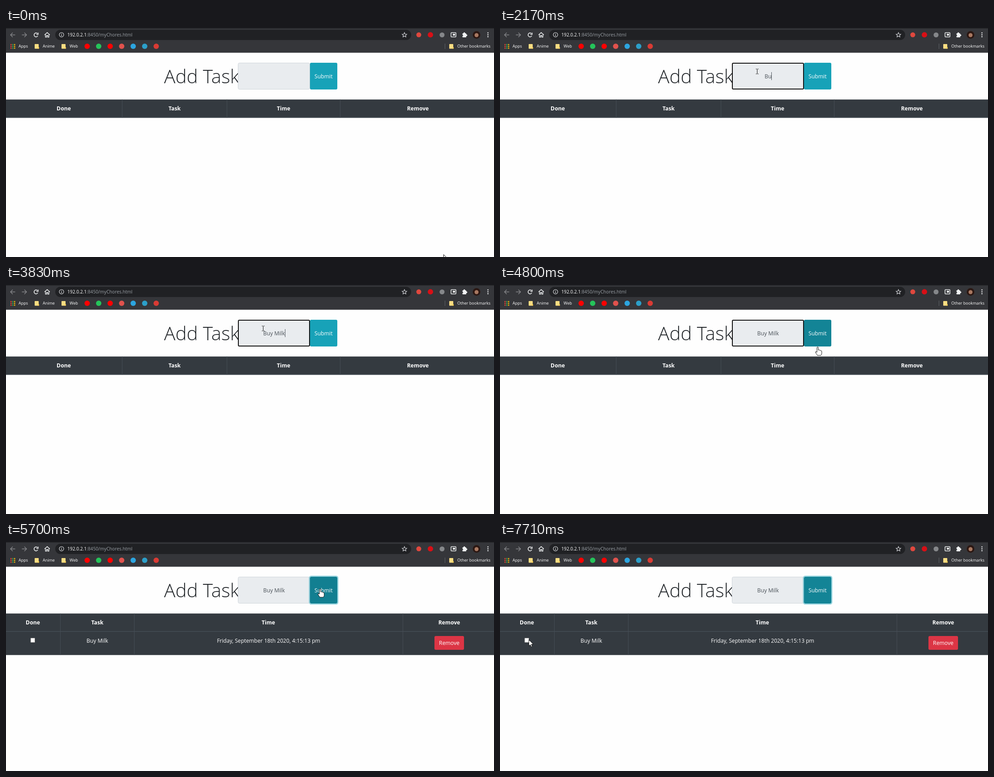
Write an HTML page with a canvas that moves like this. It is 1090x514 px and loops after 8 s.

```html
<!DOCTYPE html>
<html lang="en">
<head>
<meta charset="utf-8">
<title>Task list</title>
<style>
html, body { margin: 0; width: 100%; height: 100%; overflow: hidden; background: #fff; }
canvas { display: block; }
</style>
</head>
<body>
<canvas id="stage" width="1090" height="514"></canvas>
<script>
const ctx = document.getElementById('stage').getContext('2d');
const LOOP = 8000;
const TASK = 'Buy Milk';
const KEY_TIMES = [1840, 2170, 2380, 2600, 3060, 3280, 3590, 3830];
const CARET_SPANS = [[950, 1500], [1840, 4360], [4920, 5480]];
const CLICKS = [[950, 1070], [5480, 5700]];
// Pointer legs: first step, last step, step count, from x, y, to x, y
const LEGS = [
  [100, 850, 8, 977, 508, 574, 97],
  [4600, 4800, 3, 574, 97, 709, 138],
  [4920, 5370, 5, 709, 138, 701, 104],
  [6020, 6800, 8, 701, 104, 166, 222],
  [6920, 7710, 8, 166, 222, 64, 219]
];
const ARROW = new Path2D('M0 0V14L3.2 11 5.4 16 7.6 15 5.5 10.2H10Z');
const HAND = new Path2D('M-1.5 1.5Q0-.5 1.5 1.5V7.5Q4 6.5 5 8.3Q7 7.8 7.5 9.3Q9.2 9 9.2 11V15Q9 18 7 19.5H-.5Q-2 17-4.5 13.5Q-5.3 10.7-3.5 11L-1.5 12.5Z');
const BEAM = new Path2D('M-3-5.5H-.7M.7-5.5H3M0-5V5M-3 5.5H-.7M.7 5.5H3');

const within = (t, spans) => spans.some(([a, b]) => t >= a && t < b);

function rect(x, y, w, h, color) {
  ctx.fillStyle = color;
  ctx.fillRect(x, y, w, h);
}

function box(x, y, w, h, r, fill, stroke, lineWidth = 1) {
  ctx.beginPath();
  ctx.roundRect(x, y, w, h, r);
  paint(fill, stroke, lineWidth);
}

function disc(x, y, r, fill, stroke, lineWidth) {
  ctx.beginPath();
  ctx.arc(x, y, r, 0, 7);
  paint(fill, stroke, lineWidth);
}

function paint(fill, stroke, lineWidth = 1) {
  if (fill) { ctx.fillStyle = fill; ctx.fill(); }
  if (stroke) { ctx.strokeStyle = stroke; ctx.lineWidth = lineWidth; ctx.stroke(); }
}

function icon(x, y, d, color, lineWidth = 1.4) {
  ctx.save();
  ctx.translate(x, y);
  ctx.strokeStyle = color;
  ctx.lineWidth = lineWidth;
  ctx.stroke(new Path2D(d));
  ctx.restore();
}

function text(s, x, y, { size = 12.2, weight = 400, color = '#fff', align = 'center' } = {}) {
  ctx.font = `${weight} ${size}px "Open Sans", "Noto Sans", sans-serif`;
  ctx.textAlign = align;
  ctx.fillStyle = color;
  ctx.fillText(s, x, y);
  return ctx.measureText(s).width;
}

function folder(x, label) {
  box(x, 36, 9, 10.5, 1, '#fbdd82');
  rect(x + 7.5, 43, 2.5, 3.5, '#f3c94f');
  text(label, x + 18, 44.4, { size: 9, align: 'left' });
}

function drawBrowser() {
  rect(0, 0, 1090, 55.5, '#35363a');
  rect(0, 0, 1090, 1, '#1d1e20');
  box(110, 4, 795, 23, 11.5, '#202124');

  icon(15, 15.5, 'M5.5 0H-5M0-5L-5 0L0 5', '#86878a');
  icon(41, 15.5, 'M-5.5 0H5M0-5L5 0L0 5', '#86878a');
  icon(67, 15.5, 'M4 2A4.4 4.4 0 1 1 3.3-3M4.7-5V-1H.7', '#f1f3f4', 1.6);
  icon(92, 15.5, 'M-6 0L0-5.2L6 0M-3.8-1V5H-1.3V1.3H1.3V5H3.8V-1', '#f1f3f4');
  disc(124, 15.2, 5, null, '#e8eaed', 1.1);
  icon(124, 15.2, 'M0-3V-1.7M0-.7V3', '#e8eaed', 1.2);

  const urlStyle = { size: 10.2, align: 'left' };
  const hostWidth = text('192.0.2.1', 137, 19, urlStyle);
  text(':8450/myChores.html', 137 + hostWidth, 19, { ...urlStyle, color: '#9aa0a6' });

  icon(890, 15.5, 'M0-5.3L1.5-1.8L5.3-1.5L2.4 1L3.3 4.7L0 2.7L-3.3 4.7L-2.4 1L-5.3-1.5L-1.5-1.8Z', '#dadce0', 1.1);
  disc(922, 15.3, 5.5, '#e0483e');
  disc(948, 15.3, 6, '#d80f16');
  disc(974, 15.5, 5.5, '#85878a');
  box(994, 10.5, 11, 9.5, 1, null, '#f1f3f4', 1.5);
  rect(998, 13, 5, 4, '#f1f3f4');
  box(1019.5, 12, 8.5, 9, 1, '#f1f3f4');
  disc(1023.7, 11.8, 2, '#f1f3f4');
  disc(1028.3, 16.3, 2, '#f1f3f4');
  disc(1019.5, 16.5, 1.5, '#35363a');
  disc(1051, 15.5, 8.5, '#2b1712');
  disc(1051, 16, 4.5, '#a87861');
  for (const y of [11, 15.3, 19.6]) disc(1076.5, y, 1.3, '#f1f3f4');

  const dots = ['#ea4335', '#34a853', '#fbbc04', '#4285f4'];
  for (let i = 0; i < 9; i++) {
    const row = Math.floor(i / 3);
    rect(10 + i % 3 * 4, 36 + row * 4, 2.5, 2.5, dots[(i + row) % 4]);
  }
  text('Apps', 28, 44.4, { size: 9, align: 'left' });
  folder(64, 'Anime');
  folder(124, 'Web');
  ['#f00', '#25c45a', '#f00', '#e0524d', '#2ca5e0', '#2c9fc9', '#d93b34']
    .forEach((color, i) => disc(181.3 + i * 25.7, 41, 6, color));
  rect(980, 35, 1, 12, '#5f6368');
  folder(990, 'Other bookmarks');
}

function drawForm(t) {
  text('Add Task', 353, 123.7, { size: 42.3, weight: 300, color: '#212529', align: 'left' });

  const focused = t >= 950 && t < 5480;
  if (focused) box(519, 79, 159, 58, 2, '#e9ecef', '#101010', 2);
  else box(518.5, 78.5, 160, 59, 3, '#e9ecef', '#ced4da');

  const typed = TASK.slice(0, KEY_TIMES.filter(k => k <= t).length);
  const width = text(typed, 598.7, 113, { color: '#495057' });
  if (within(t, CARET_SPANS)) rect(Math.round(598.7 + width / 2), 99, 1, 18, '#495057');

  const ring = t < 5610 ? 0 : t < 5700 ? 1.8 : 2.5;
  if (ring) box(679 - ring / 2, 78 - ring / 2, 61 + ring, 60 + ring, 4, null, 'rgba(58,176,195,.5)', ring);
  const color = t < 4800 ? '#17a2b8' : t < 5480 ? '#138496'
    : t < 5700 ? '#117a8b' : t < 5800 ? '#127f91' : '#138496';
  box(679, 78, 61, 60, 3, color);
  text('Submit', 709.3, 113);
}

function drawTable(filled) {
  const line = '#454d55';
  const top = 160.5;
  const height = (filled ? 253.7 : 201.5) - top;
  const centers = filled ? [60, 204, 586, 990] : [129, 376.5, 620, 920];
  const edges = filled ? [121, 286, 886] : [259, 493, 746];
  rect(0, top, 1090, height, '#343a40');
  rect(0, 200, 1090, 1.5, line);
  for (const x of edges) rect(x, top, 1, height, line);
  ['Done', 'Task', 'Time', 'Remove'].forEach((s, i) => text(s, centers[i], 185.4, { weight: 700 }));
  if (!filled) return;
  box(55, 215.5, 9.5, 10, 1, '#fff', '#767676');
  text(TASK, 204, 225.5);
  text('Friday, September 18th 2020, 4:15:13 pm', 586.5, 225.5, { size: 12.1 });
  box(957, 211, 66, 31, 3, '#dc3545');
  text('Remove', 990, 231);
}

function pointerAt(t) {
  let x = 977, y = 508;
  for (const [start, end, steps, x0, y0, x1, y1] of LEGS) {
    if (t < start) break;
    const step = Math.floor((t - start) / (end - start) * (steps - 1) + 1e-6) + 1;
    const p = Math.min(1, step / steps);
    const eased = p * p * (3 - 2 * p);
    x = x0 + (x1 - x0) * eased;
    y = y0 + (y1 - y0) * eased;
  }
  return [Math.round(x), Math.round(y)];
}

function drawPointer(t) {
  const [x, y] = pointerAt(t);
  const inForm = y >= 78 && y <= 138;
  if (within(t, CLICKS)) disc(x - 1, y + .5, 9.5, 'rgba(255,255,0,.5)');
  ctx.save();
  ctx.translate(x + .5, y + .5);
  ctx.lineWidth = 1;
  ctx.lineJoin = 'round';
  ctx.fillStyle = '#fff';
  ctx.strokeStyle = '#111';
  if (inForm && x >= 518 && x < 679) {
    ctx.stroke(BEAM);
  } else {
    const shape = inForm && x >= 679 && x <= 740 ? HAND : ARROW;
    ctx.fill(shape);
    ctx.stroke(shape);
  }
  ctx.restore();
}

function frame(now) {
  const t = now % LOOP;
  rect(0, 0, 1090, 514, '#fefefe');
  drawBrowser();
  drawTable(t >= 5700);
  drawForm(t);
  drawPointer(t);
  requestAnimationFrame(frame);
}
requestAnimationFrame(frame);
</script>
</body>
</html>
```
